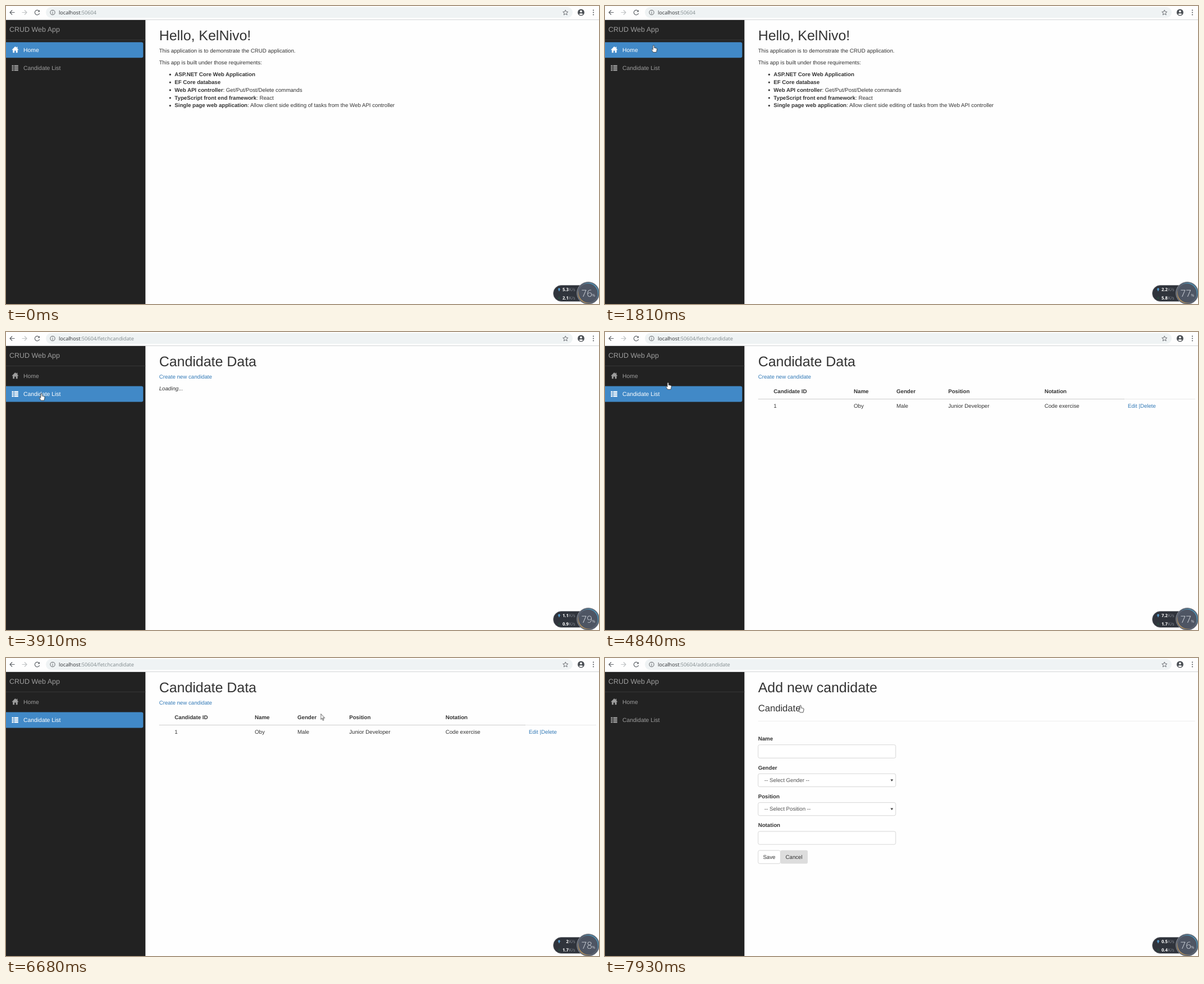
An HTML page for the animation above (8 s loop, 1056 px wide and 531 px high).

```html
<!DOCTYPE html>
<html lang="en">
<head>
<meta charset="utf-8">
<title>CRUD Web App</title>
<style>
html, body { margin: 0; width: 100%; height: 100%; overflow: hidden; background: #fefefe; }
svg { display: block; width: 100vw; height: 100vh; }
text { font: 9.7px "Liberation Sans", Arial, sans-serif; fill: #333; text-rendering: geometricPrecision; white-space: pre; }
.b { font-weight: bold; }
.i { font-style: italic; }
.h1 { font-size: 24.95px; }
.h3 { font-size: 16.62px; }
.nav { font-size: 10.39px; fill: #9d9d9d; }
.brand { font-size: 12.47px; fill: #9d9d9d; }
.link { fill: #337ab7; }
.field { fill: #fff; stroke: #ccc; stroke-width: .8; }
.choice { fill: #555; }
.url { font: 9.16px "Open Sans", sans-serif; fill: #7f898c; }
.stat { font: bold 7.8px "Open Sans", sans-serif; fill: #fff; text-anchor: end; }
.unit { font: 7.8px "Open Sans", sans-serif; fill: #8b9099; }
.pct { font: 300 17px "Open Sans", sans-serif; fill: #d9dde3; }

/* hard switches */
.sw, #cursor { animation: 8s step-end infinite; }
#home { animation-name: home; }
#list { animation-name: list; }
#loading { animation-name: loading; }
#table { animation-name: table; }
#add { animation-name: add; }
#brand { animation-name: brand; }
#navHome { animation-name: navHome; fill: #9d9d9d; }
#navList { animation-name: navList; fill: #9d9d9d; }
#create { animation-name: create; }
#click1 { animation-name: click1; }
#click2 { animation-name: click2; }
#arrow { animation-name: arrow; }
#hand { animation-name: hand; }
#navHome text, #navList text { fill: inherit; }

@keyframes home { 0% { opacity: 1 } 48.875%, to { opacity: 0 } }
@keyframes list { 0% { opacity: 0 } 48.875% { opacity: 1 } 99.125%, to { opacity: 0 } }
@keyframes loading { 0% { opacity: 1 } 58.625%, to { opacity: 0 } }
@keyframes table { 0% { opacity: 0 } 58.625%, to { opacity: 1 } }
@keyframes add { 0% { opacity: 0 } 99.125%, to { opacity: 1 } }
@keyframes brand {
  0%, 14.5%, 20.75%, to { fill: #9d9d9d }
  13%, 15.75% { fill: #fff }
}
@keyframes navHome {
  0%, 60.625% { fill: #fff }
  48.875%, 63.5%, to { fill: #9d9d9d }
}
@keyframes navList { 0%, 99.125%, to { fill: #9d9d9d } 28.75% { fill: #fff } }
@keyframes create {
  0% { fill: #337ab7; text-decoration: none }
  91.375%, to { fill: #23527c; text-decoration: underline }
}
@keyframes click1 { 0%, 48.875%, to { opacity: 0 } 46.875% { opacity: 1 } }
@keyframes click2 { 0%, 99.125%, to { opacity: 0 } 97.5% { opacity: 1 } }
@keyframes arrow { 0%, 12.5%, 91.375%, to { opacity: 0 } 5.125%, 63.5% { opacity: 1 } }
@keyframes hand { 0%, 63.5% { opacity: 0 } 12.5%, 91.375%, to { opacity: 1 } }

#cursor { animation-name: move; animation-timing-function: linear; }
@keyframes move {
  0%, 5.125% { transform: translate(330px, 528px); animation-timing-function: ease-out }
  13.25% { transform: translate(85px, 30px) }
  15% { transform: translate(90px, 62px) }
  17.75%, 19.75% { transform: translate(88px, 46px) }
  22.625%, 23.5% { transform: translate(86.5px, 70px) }
  26.25% { transform: translate(84px, 80px) }
  29.375% { transform: translate(66px, 103px) }
  32.25%, 54.625% { transform: translate(63px, 109.5px) }
  56.625%, 58.5% { transform: translate(74px, 104px) }
  62.5% { transform: translate(150px, 76px) }
  67.25%, 69.125% { transform: translate(371.5px, 74px) }
  71.125%, 73% { transform: translate(373px, 76px); animation-timing-function: ease-in-out }
  76.875%, 79.5% { transform: translate(929px, 152px) }
  83.5%, 84.5% { transform: translate(560.5px, 99.5px) }
  89.375% { transform: translate(407px, 85px) }
  92.25%, 94.25% { transform: translate(344px, 77px) }
  95.25%, to { transform: translate(348px, 84.5px) }
}
</style>
</head>
<body>
<svg viewBox="0 0 1056 531" preserveAspectRatio="none">
  <rect width="1056" height="531" fill="#fefefe"/>

  <!-- browser bar -->
  <rect y="24" width="1056" height="1" fill="#d3d5d7"/>
  <rect x="71" y="2" width="938" height="19" rx="9.5" fill="#eff3f4"/>
  <g fill="none" stroke="#5f6368" stroke-width="1.2">
    <path d="M15.5 11.5H7M11 7.5L7 11.5L11 15.5"/>
    <path d="M28.5 11.5H37M33 7.5L37 11.5L33 15.5" stroke="#bfc2c4"/>
    <path d="M59.2 9.5A4.2 4.2 0 1 0 59.6 12.8"/>
    <path d="M60 7V10.6H56.4Z" fill="#5f6368" stroke="none"/>
    <circle cx="83" cy="11.5" r="4.1" stroke-width="1"/>
    <path d="M83 11V14M83 9V10" stroke-width="1"/>
    <path d="M996.3 7L997.6 10.1L1000.9 10.4L998.4 12.6L999.2 15.9L996.3 14.1L993.4 15.9L994.2 12.6L991.7 10.4L995 10.1Z" stroke-width=".9"/>
  </g>
  <circle cx="1024" cy="11.5" r="6" fill="#4d5156"/>
  <circle cx="1024" cy="9.6" r="1.9" fill="#fff"/>
  <path d="M1020.2 14.6Q1024 11.4 1027.8 14.6Q1024 18 1020.2 14.6Z" fill="#fff"/>
  <g fill="#5f6368">
    <circle cx="1046" cy="7.5" r="1.1"/><circle cx="1046" cy="11.5" r="1.1"/><circle cx="1046" cy="15.5" r="1.1"/>
  </g>
  <text class="url" x="94" y="15"><tspan fill="#2b2e31">localhost</tspan>:50604</text>

  <!-- sidebar -->
  <rect y="25" width="248.3" height="506" fill="#222"/>
  <rect y="60" width="248.3" height="1" fill="#373737"/>
  <text id="brand" class="brand sw" x="6" y="46.4">CRUD Web App</text>

  <g id="home" class="sw">
    <rect x="-4" y="64.5" width="248.3" height="27.8" rx="3" fill="#4189c7"/>
    <text class="h1" x="272.7" y="61">Hello, KelNivo!</text>
    <text x="272.7" y="83">This application is to demonstrate the CRUD application.</text>
    <text x="272.7" y="103.8">This app is built under those requirements:</text>
    <g id="bullets"></g>
    <text x="300.3" y="125"><tspan class="b">ASP.NET Core Web Application</tspan></text>
    <text x="300.3" y="138.8"><tspan class="b">EF Core database</tspan></text>
    <text x="300.3" y="152.7"><tspan class="b">Web API controller</tspan>: Get/Put/Post/Delete commands</text>
    <text x="300.3" y="166.5"><tspan class="b">TypeScript front end framework</tspan>: React</text>
    <text x="300.3" y="180.4"><tspan class="b">Single page web application</tspan>: Allow client side editing of tasks from the Web API controller</text>
  </g>

  <g id="list" class="sw">
    <rect x="-4" y="96.6" width="248.3" height="27.8" rx="3" fill="#4189c7"/>
    <text class="url" x="161" y="15">/fetchcandidate</text>
    <text class="h1" x="272.7" y="61">Candidate Data</text>
    <text id="create" class="link sw" x="272.7" y="83">Create new candidate</text>
    <text id="loading" class="i sw" x="272.7" y="103.8">Loading...</text>
    <g id="table" class="sw">
      <g class="b">
        <text class="b" x="300.3" y="109.3">Candidate ID</text>
        <text class="b" x="443" y="109.3">Name</text>
        <text class="b" x="519" y="109.3">Gender</text>
        <text class="b" x="611.2" y="109.3">Position</text>
        <text class="b" x="782.7" y="109.3">Notation</text>
      </g>
      <rect x="272.7" y="119" width="652.6" height="1" fill="#ccc"/>
      <rect x="925.3" y="119" width="125.7" height="1" fill="#e8e8e8"/>
      <text x="300.3" y="135.4">1</text>
      <text x="443" y="135.4">Oby</text>
      <text x="519" y="135.4">Male</text>
      <text x="611.2" y="135.4">Junior Developer</text>
      <text x="782.7" y="135.4">Code exercise</text>
      <text class="link" x="931" y="135.4">Edit |Delete</text>
    </g>
  </g>

  <g id="add" class="sw">
    <text class="url" x="161" y="15">/addcandidate</text>
    <text class="h1" x="272.7" y="61">Add new candidate</text>
    <text class="h3" x="272.7" y="95">Candidate</text>
    <rect x="272.7" y="112" width="778.3" height="1" fill="#eee"/>
    <text class="b" x="272.7" y="147">Name</text>
    <rect class="field" x="272.7" y="154.7" width="245" height="23.6" rx="2.8"/>
    <text class="b" x="272.7" y="198.8">Gender</text>
    <rect class="field" x="272.7" y="206.2" width="245" height="23.2" rx="2.8"/>
    <text class="choice" x="283.8" y="221.2">-- Select Gender --</text>
    <path d="M508.4 216.2H513.2L510.8 220Z" fill="#444"/>
    <text class="b" x="272.7" y="250">Position</text>
    <rect class="field" x="272.7" y="257.6" width="245" height="23.2" rx="2.8"/>
    <text class="choice" x="283.8" y="272.4">-- Select Position --</text>
    <path d="M508.4 267.4H513.2L510.8 271.2Z" fill="#444"/>
    <text class="b" x="272.7" y="301.4">Notation</text>
    <rect class="field" x="272.7" y="309" width="245" height="23.2" rx="2.8"/>
    <rect class="field" x="272.7" y="342.9" width="39.8" height="23.4" rx="2.8"/>
    <text x="281.4" y="357.8">Save</text>
    <rect x="312.5" y="342.5" width="48.5" height="24" rx="2.8" fill="#ddd"/>
    <text x="321.5" y="357.8">Cancel</text>
  </g>

  <g id="navHome" class="sw">
    <path d="M16.4 72L10.3 78.2H12.2V83.3H15.1V79.6H17.7V83.3H20.6V78.2H22.5L20.4 76V72.8H18.8V74.4Z"/>
    <text class="nav" x="31" y="82">Home</text>
  </g>
  <g id="navList" class="sw">
    <path d="M10.5 105.6h3v2.6h-3zM14.6 105.6h7.2v2.6h-7.2zM10.5 109.2h3v2.6h-3zM14.6 109.2h7.2v2.6h-7.2zM10.5 112.8h3v2.6h-3zM14.6 112.8h7.2v2.6h-7.2z"/>
    <text class="nav" x="31" y="114">Candidate List</text>
  </g>

  <!-- speed widget -->
  <defs>
    <linearGradient id="ring" x1="1" y1="0" x2="0" y2="1">
      <stop offset=".2" stop-color="#4f9fc4"/><stop offset=".45" stop-color="#5d6573"/>
      <stop offset=".65" stop-color="#5d6573"/><stop offset=".85" stop-color="#c39a5c"/>
    </linearGradient>
  </defs>
  <rect x="974.5" y="497.5" width="70" height="29" rx="14.5" fill="#30343c" stroke="#a5a8ac" stroke-width=".6"/>
  <path d="M985 502.3L987.6 505.2H985.8V508H984.2V505.2H982.4Z" fill="#5aa9e0"/>
  <path d="M985 523L982.6 520.3H984.3V517.6H985.7V520.3H987.4Z" fill="#2c4a40"/>
  <text id="up" class="stat" x="1002" y="507.8"></text>
  <text class="unit" x="1002.4" y="507.8">K/s</text>
  <text id="down" class="stat" x="1002" y="522.8"></text>
  <text class="unit" x="1002.4" y="522.8">K/s</text>
  <circle cx="1036.8" cy="511.5" r="20" fill="#505766" stroke="#a9acb1" stroke-width=".8"/>
  <circle cx="1036.8" cy="511.5" r="17.6" fill="#4e5563" stroke="url(#ring)" stroke-width="1.4"/>
  <text id="pct" class="pct" x="1024.6" y="518"></text>
  <text class="unit" x="1043.6" y="518" style="font-size:7px;fill:#c9ced6">%</text>

  <!-- pointer -->
  <circle id="click1" class="sw" cx="62.5" cy="108.5" r="8.3" fill="#ff0" fill-opacity=".47"/>
  <circle id="click2" class="sw" cx="347.5" cy="84" r="8.3" fill="#ff0" fill-opacity=".47"/>
  <g id="cursor" fill="#fff" stroke="#222" stroke-width=".8" stroke-linejoin="round">
    <path id="arrow" class="sw" d="M0 0V10L2.3 7.9L3.9 11.4L5.4 10.7L3.9 7.3H7Z"/>
    <path id="hand" class="sw" d="M-1.2 1.2Q-1.2 0 0 0T1.2 1.2V4.4L5 5.2Q6.2 5.6 6.1 7L5.5 10.2L4.8 12.4H-.8L-3.4 8.2Q-3.8 7 -2.6 6.8L-1.2 8Z"/>
  </g>
</svg>
<script>
const $ = id => document.getElementById(id);
const LOOP = 8000;

$("bullets").innerHTML = [0, 1, 2, 3, 4]
  .map(n => `<circle cx="292.3" cy="${122.2 + n * 13.85}" r="1.6" fill="#333"/>`).join("");

// start ms, upload, download, load percent
const stats = [
  [0, "5.3", "2.1", 76],
  [490, "3.6", "4.4", 76],
  [1340, "2.2", "4.4", 77],
  [1580, "2.2", "5.8", 77],
  [2350, "2.2", "5.8", 78],
  [2430, "0.3", "0", 78],
  [3440, "1.1", "0.9", 78],
  [3520, "1.1", "0.9", 79],
  [4450, "7.2", "1.7", 77],
  [5530, "4.1", "2.3", 78],
  [6530, "2", "1.7", 78],
  [7550, "0.5", "0.4", 78],
  [7930, "0.5", "0.4", 76]
];

let start, shown;
function draw(now) {
  start ??= now;
  const t = (now - start) % LOOP;
  const row = stats.findLast(s => s[0] <= t);
  if (row !== shown) {
    shown = row;
    ["up", "down", "pct"].forEach((id, n) => $(id).textContent = row[n + 1]);
  }
  requestAnimationFrame(draw);
}
requestAnimationFrame(draw);
</script>
</body>
</html>
```
